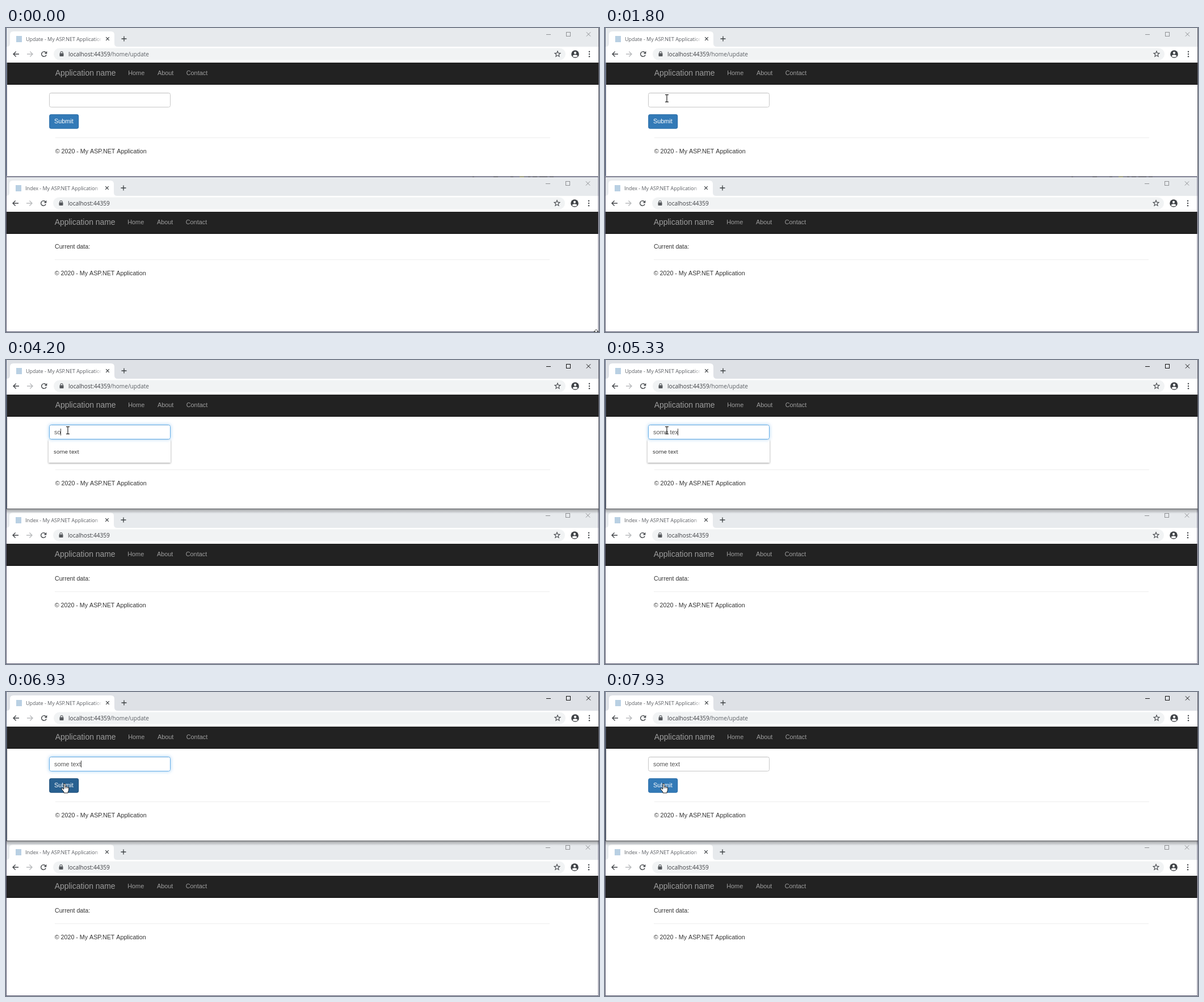
These frames come from a looping animation (1045 by 536 pixels, 8 s). An HTML page with a canvas:

```html
<!DOCTYPE html>
<html lang="en">
<head>
<meta charset="utf-8">
<title>Live update demo</title>
<style>
  html, body { margin: 0; width: 100%; height: 100%; overflow: hidden; background: #fff; }
  canvas { display: block; width: 1045px; height: 536px; }
</style>
</head>
<body>
<canvas id="stage" width="1045" height="536"></canvas>
<script>
const g = document.getElementById('stage').getContext('2d');
const LOOP = 8000, STEP = 200 / 3;
const ARIAL = '"Liberation Sans", Arial, sans-serif';
const UI = '"Open Sans", "Noto Sans", sans-serif';
const FIELD = '10.85px ' + ARIAL;

// Pointer way points: time, x, y
const PATH = [
  [0, 1040, 540], [200, 1040, 540], [267, 900, 521], [400, 428, 463],
  [1000, 428, 463], [1133, 190, 260], [1200, 60, 160], [1267, 16, 112], [1333, 114, 98],
  [1400, 114, 98], [1467, 92, 125], [1533, 46, 190], [1600, 4, 238], [1667, 10, 247],
  [1733, 64, 184], [1800, 109, 124],
  [6333, 109, 124], [6400, 108, 133], [6533, 107, 146], [6667, 106, 155], [6933, 103, 161]
];

// Typing: time, number of letters shown
const WORD = 'some text';
const KEYS = [[3800, 1], [4200, 2], [4333, 3], [4467, 4], [4733, 5], [5000, 6], [5067, 7], [5333, 8], [5667, 9]];
const FOCUS = 2930, CLICK = 7265, LOAD = 7465, DONE = 7930;

const clamp = v => Math.max(0, Math.min(1, v));

function text(s, x, y, font, color) {
  g.font = font;
  g.fillStyle = color;
  g.fillText(s, x, y);
}

function rect(x, y, w, h, color) {
  g.fillStyle = color;
  g.fillRect(x, y, w, h);
}

function roundRect(x, y, w, h, r) {
  g.beginPath();
  g.roundRect(x, y, w, h, r);
}

function stroke(color, width, ...lines) {
  g.strokeStyle = color;
  g.lineWidth = width;
  g.beginPath();
  for (const p of lines) {
    g.moveTo(p[0], p[1]);
    for (let i = 2; i < p.length; i += 2) g.lineTo(p[i], p[i + 1]);
  }
  g.stroke();
}

function disc(x, y, r, color) {
  g.fillStyle = color;
  g.beginPath();
  g.arc(x, y, r, 0, 7);
  g.fill();
}

function cross(x, y, r, color, w) {
  stroke(color, w, [x - r, y - r, x + r, y + r], [x + r, y - r, x - r, y + r]);
}

function controls(color) {
  stroke(color, 1, [952, 11.5, 960, 11.5]);
  g.strokeRect(987.5, 7.5, 7, 7);
  cross(1026.5, 11, 3.6, color, 1);
}

function tab(title, spin) {
  g.fillStyle = '#fff';
  g.beginPath();
  g.moveTo(1, 33);
  g.quadraticCurveTo(7, 33, 7, 27);
  g.lineTo(7, 12);
  g.quadraticCurveTo(7, 6, 13, 6);
  g.lineTo(185, 6);
  g.quadraticCurveTo(191, 6, 191, 12);
  g.lineTo(191, 27);
  g.quadraticCurveTo(191, 33, 197, 33);
  g.fill();
  if (spin < 0) rect(18, 14, 10, 11, '#b9d0e3');
  else {
    g.strokeStyle = '#5f6368';
    g.lineWidth = 1.3;
    g.beginPath();
    const a = -1.75 + spin * 5;
    g.arc(23, 19, 5.5, a, a + 0.35 + spin * 3);
    g.stroke();
  }
  g.save();
  g.beginPath();
  g.rect(30, 8, 138, 22);
  g.clip();
  text(title, 35, 22.5, '8.95px ' + UI, '#5b5e63');
  g.restore();
  if (g.measureText(title).width > 133) {
    const fade = g.createLinearGradient(157, 0, 169, 0);
    fade.addColorStop(0, 'rgba(255,255,255,0)');
    fade.addColorStop(1, '#fff');
    rect(157, 10, 12, 18, fade);
  }
  cross(179, 19, 2.8, '#3c4043', 1.2);
  stroke('#3c4043', 1.3, [203.5, 19, 212.5, 19], [208, 14.5, 208, 23.5]);
}

function arrowIcon(x, dir, color) {
  stroke(color, 1.4, [x - 5 * dir, 46, x + 4.5 * dir, 46], [x + 0.4 * dir, 41.4, x + 5 * dir, 46, x + 0.4 * dir, 50.6]);
}

function star(x, y) {
  g.beginPath();
  for (let i = 0; i < 10; i++) {
    const r = i % 2 ? 2.3 : 5.2, a = -Math.PI / 2 + i * Math.PI / 5;
    g.lineTo(x + r * Math.cos(a), y + r * Math.sin(a));
  }
  g.closePath();
  g.strokeStyle = '#4a4d51';
  g.lineWidth = 1.1;
  g.stroke();
}

function toolbar(path, loading) {
  rect(0, 33, 1045, 28, '#fff');
  arrowIcon(18, -1, '#45484c');
  arrowIcon(42, 1, '#babcbe');
  if (loading) cross(67.5, 46, 4, '#45484c', 1.4);
  else {
    g.strokeStyle = '#45484c';
    g.lineWidth = 1.5;
    g.beginPath();
    g.arc(67, 46, 4.3, 0.35, 5.5);
    g.stroke();
    g.fillStyle = '#45484c';
    g.beginPath();
    g.moveTo(72.3, 40.8);
    g.lineTo(72.3, 45.4);
    g.lineTo(67.7, 45.4);
    g.fill();
  }
  g.fillStyle = '#f1f3f4';
  roundRect(84, 35.5, 902, 21, 10.5);
  g.fill();
  g.fillStyle = '#55585c';
  roundRect(94.5, 44.5, 7, 5.6, 0.8);
  g.fill();
  g.strokeStyle = '#55585c';
  g.lineWidth = 1.1;
  g.beginPath();
  g.arc(98, 43.6, 2.1, Math.PI, 0);
  g.lineTo(100.1, 45);
  g.moveTo(95.9, 43.6);
  g.lineTo(95.9, 45);
  g.stroke();
  const host = 'localhost:44359', font = '10.1px ' + UI;
  text(host, 110, 49.7, font, '#3a3c40');
  text(path, 110 + g.measureText(host).width, 49.7, font, '#5b5f64');
  star(972, 46);
  disc(1003, 46, 6.8, '#3f4246');
  disc(1003, 43.9, 2.1, '#fff');
  g.fillStyle = '#fff';
  g.beginPath();
  g.ellipse(1003, 49.2, 4.1, 2, 0, 0, 7);
  g.fill();
  for (const y of [41.7, 46, 50.3]) disc(1028, y, 1.2, '#45484c');
}

function navbar(hover) {
  rect(0, 61, 1045, 39, '#222');
  rect(0, 99, 1045, 1, '#080808');
  text('Application name', 86.7, 84.3, '13.95px ' + ARIAL, hover ? '#fff' : '#9d9d9d');
  [['Home', 215.2], ['About', 266.9], ['Contact', 317.7]].forEach(([s, x]) =>
    text(s, x, 83.4, '10.9px ' + ARIAL, '#9d9d9d'));
}

function footer(y) {
  rect(87, y, 872, 1, '#eee');
  text('\u00a9 2020 - My ASP.NET Application', 86.7, y + 27.6, '10.7px ' + ARIAL, '#333');
}

function lowerWindow() {
  g.save();
  g.translate(-1, 263);
  rect(0, 0, 1046, 273, '#fff');
  rect(0, 0, 1046, 33, '#e7eaed');
  controls('#8f9194');
  tab('Index - My ASP.NET Application', -1);
  toolbar('', false);
  navbar(false);
  text('Current data:', 87, 126, '10.65px ' + ARIAL, '#333');
  footer(145);
  g.restore();
  g.strokeStyle = '#5c5c74';
  g.lineWidth = 1;
  g.strokeRect(0.5, 262.5, 1043.5, 273);
}

function field(t, shown, glow) {
  g.save();
  if (glow > 0) {
    g.shadowColor = `rgba(102,175,233,${0.6 * glow})`;
    g.shadowBlur = 6;
  }
  g.fillStyle = '#fff';
  roundRect(76, 114, 214, 26, 3);
  g.fill();
  g.restore();
  rect(77, 115, 212, 1, 'rgba(0,0,0,.05)');
  const mix = (a, b) => Math.round(a + (b - a) * glow);
  g.strokeStyle = `rgb(${mix(200, 102)},${mix(200, 175)},${mix(200, 233)})`;
  g.lineWidth = 1;
  roundRect(76.5, 114.5, 213, 25, 3);
  g.stroke();
  const s = WORD.slice(0, shown);
  text(s, 85, 131, FIELD, '#555');
  if (t >= FOCUS && t < CLICK) {
    const last = KEYS.reduce((a, k) => t >= k[0] - 3 ? k[0] : a, FOCUS);
    if (Math.floor((t - last + 6) / 533) % 2 === 0) {
      const x = shown ? Math.floor(85 + g.measureText(s).width) : 86;
      rect(x, 121, 1, 12, '#444');
    }
  }
}

function button(hover, ring) {
  const lit = hover || ring;
  g.fillStyle = lit ? '#286090' : '#337ab7';
  roundRect(76.3, 152.3, 51.8, 25.3, 3);
  g.fill();
  g.strokeStyle = lit ? '#204d74' : '#2e6da4';
  g.lineWidth = 0.75;
  roundRect(76.7, 152.7, 51, 24.5, 2.7);
  g.stroke();
  if (ring) {
    g.lineWidth = 1;
    g.strokeStyle = '#fff';
    roundRect(77.3, 153.3, 50, 23.4, 2.5);
    g.stroke();
    g.strokeStyle = '#101010';
    g.lineWidth = 1.8;
    roundRect(78.5, 154.5, 47.6, 21, 2);
    g.stroke();
  }
  text('Submit', 85, 168.4, '10.85px ' + ARIAL, '#fff');
}

function suggestions() {
  g.save();
  g.shadowColor = 'rgba(0,0,0,.4)';
  g.shadowBlur = 3;
  g.shadowOffsetY = 1;
  rect(75, 141, 215, 40, '#fff');
  g.restore();
  text(WORD, 84, 164.5, '500 9.75px ' + UI, '#222');
}

function upperWindow(t, kind, pos) {
  const active = t >= FOCUS, loading = t >= LOAD && t < DONE;
  const shown = KEYS.reduce((n, k) => t >= k[0] - 3 ? k[1] : n, 0);
  const glow = t < CLICK ? clamp((t - FOCUS) / 190) : clamp(1 - (t - CLICK + 50) / 110);
  rect(0, 0, 1045, 262, '#fff');
  rect(0, 0, 1045, 33, active ? '#dee1e6' : '#e7eaed');
  controls(active ? '#111' : '#8f9194');
  tab(loading ? 'https://localhost:44359/home/update' : 'Update - My ASP.NET Application',
    loading ? (t - LOAD) / 500 : -1);
  toolbar('/home/update', loading);
  navbar(kind === 'hand' && pos[1] < 110);
  footer(193);
  if (shown && shown < WORD.length) suggestions();
  else button(kind === 'hand' && pos[1] > 140 && t < DONE, t >= CLICK && t < DONE);
  field(t, shown, glow);
  rect(0, 0, 1, 262, '#53607c');
  rect(1, 61, 1, 201, active ? '#4d5058' : '#8b90a0');
  rect(1044, 0, 1, 262, '#5c5c68');
  if (active) {
    rect(0, 262, 1045, 1, '#55565c');
    const shade = g.createLinearGradient(0, 263, 0, 271);
    shade.addColorStop(0, 'rgba(0,0,0,.3)');
    shade.addColorStop(1, 'rgba(0,0,0,0)');
    rect(1, 263, 1044, 8, shade);
  } else {
    rect(0, 261, 1045, 1, '#a6a8b2');
    [[822, 3], [859, 8], [889, 5], [920, 4], [928, 8], [940, 14], [958, 7]].forEach(([x, w]) => rect(x, 262, w, 1, '#3a3a44'));
    rect(905, 262, 8, 1, '#8a8a40');
  }
}

function pointerAt(t) {
  let i = 0;
  while (i < PATH.length - 2 && t >= PATH[i + 1][0]) i++;
  const [a, b] = [PATH[i], PATH[i + 1]];
  const k = clamp((t - a[0]) / (b[0] - a[0]));
  return [a[1] + (b[1] - a[1]) * k, a[2] + (b[2] - a[2]) * k];
}

function pointerKind([x, y]) {
  const inside = (l, t, r, b) => x >= l && x <= r && y >= t && y <= b;
  if (y > 534) return 'size';
  if (inside(76, 114, 290, 140)) return 'beam';
  if (inside(75, 61, 204, 100) || inside(76, 152, 128, 178)) return 'hand';
  return 'arrow';
}

const SHAPES = {
  arrow: 'M0 0V12.6L2.9 9.9L4.9 14.4L6.9 13.5L5 9.1H9Z',
  hand: 'M-1.2 1Q0 -.6 1.2 1V6Q2.4 4.9 3.4 6.4Q4.6 5.4 5.6 6.9Q7.4 6.3 7.6 8.2V12Q7 14 6.2 15.2V17H-1V15.2L-5 10.2Q-5.4 8 -3.4 8.4L-1.2 10.4Z',
  size: 'M0 -8.5L4 -4.5H1.2V4.5H4L0 8.5L-4 4.5H-1.2V-4.5H-4Z'
};
for (const k in SHAPES) SHAPES[k] = new Path2D(SHAPES[k]);

function pointer(kind, [x, y]) {
  g.save();
  g.translate(x, y);
  if (kind === 'beam') {
    stroke('#222', 1.2, [-3, -6.3, -0.6, -6.3, 0, -5.7, 0.6, -6.3, 3, -6.3], [0, -6, 0, 6],
      [-3, 6.3, -0.6, 6.3, 0, 5.7, 0.6, 6.3, 3, 6.3]);
  } else {
    g.fillStyle = '#fff';
    g.fill(SHAPES[kind]);
    g.strokeStyle = '#111';
    g.lineWidth = 0.9;
    g.lineJoin = 'round';
    g.stroke(SHAPES[kind]);
    if (kind === 'hand') stroke('#111', 0.7, [1.2, 6, 1.2, 9], [3.4, 6.6, 3.4, 9], [5.6, 7, 5.6, 9]);
  }
  g.restore();
}

function draw(now) {
  const t = Math.floor((now + 8) % LOOP / STEP) * STEP + 1;
  const pos = pointerAt(t), kind = pointerKind(pos);
  g.clearRect(0, 0, 1045, 536);
  lowerWindow();
  upperWindow(t, kind, pos);
  pointer(kind, pos);
}

let start;
function tick(now) {
  if (start === undefined) start = now;
  draw(now - start);
  requestAnimationFrame(tick);
}
requestAnimationFrame(tick);
</script>
</body>
</html>
```
